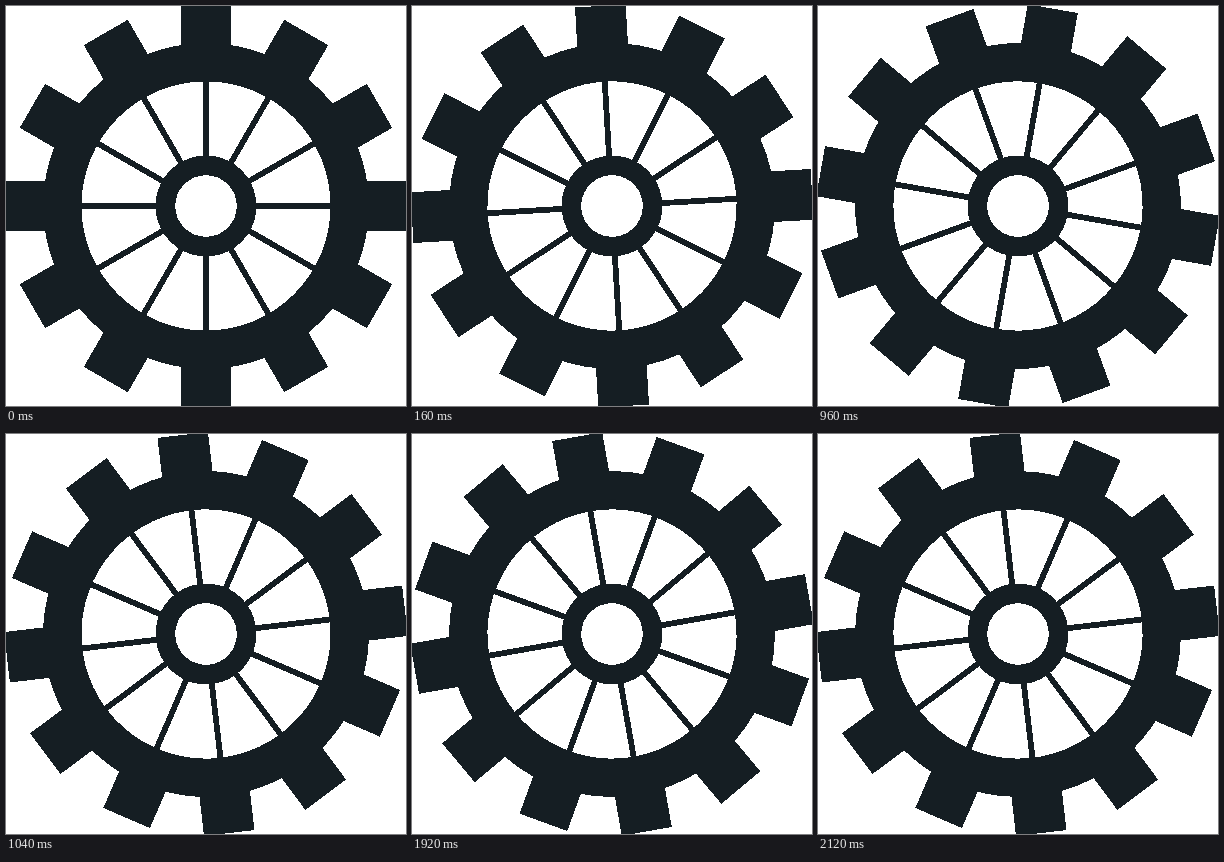
Write an HTML page that moves like this. It is 400 px wide and 400 px high and loops after 2880 ms.

```html
<!DOCTYPE html>
<html lang="en">
<head>
<meta charset="utf-8">
<title>Ticking gear</title>
<style>
  html, body { margin: 0; height: 100%; overflow: hidden; background: #fff; }
  svg { display: block; fill: #151e23; shape-rendering: crispEdges; }
  .hole { fill: #fff; }
</style>
</head>
<body>
<svg width="400" height="400" viewBox="-200 -200 400 400"><g id="gear"></g></svg>
<script>
const FRAME = 40, TICK = 960, TURN = 240, STEP = 40;
const gear = document.getElementById('gear');

// Six diameters give twelve teeth or spokes.
const diameters = (width, radius) => [0, 30, 60, 90, 120, 150].map(angle =>
  `<rect x="${-width / 2}" y="${-radius}" width="${width}" height="${2 * radius}"
    transform="rotate(${angle})"/>`).join('');

const disc = (radius, name = '') => `<circle r="${radius}" class="${name}"/>`;

gear.innerHTML =
  diameters(50.8, 200.4) + disc(162.9) + disc(124.6, 'hole') +
  diameters(5.8, 126) + disc(50.4) + disc(30.8, 'hole');

// Each tick turns the gear 40 degrees at constant speed, then rests.
function angleAt(time) {
  const t = Math.floor(time / FRAME) * FRAME + FRAME;
  const turned = Math.floor(t / TICK) + Math.min(t % TICK / TURN, 1);
  return STEP * (turned - FRAME / TURN);
}

function draw(now) {
  gear.setAttribute('transform', `rotate(${angleAt(now % (3 * TICK))})`);
  requestAnimationFrame(draw);
}
draw(performance.now());
</script>
</body>
</html>
```
